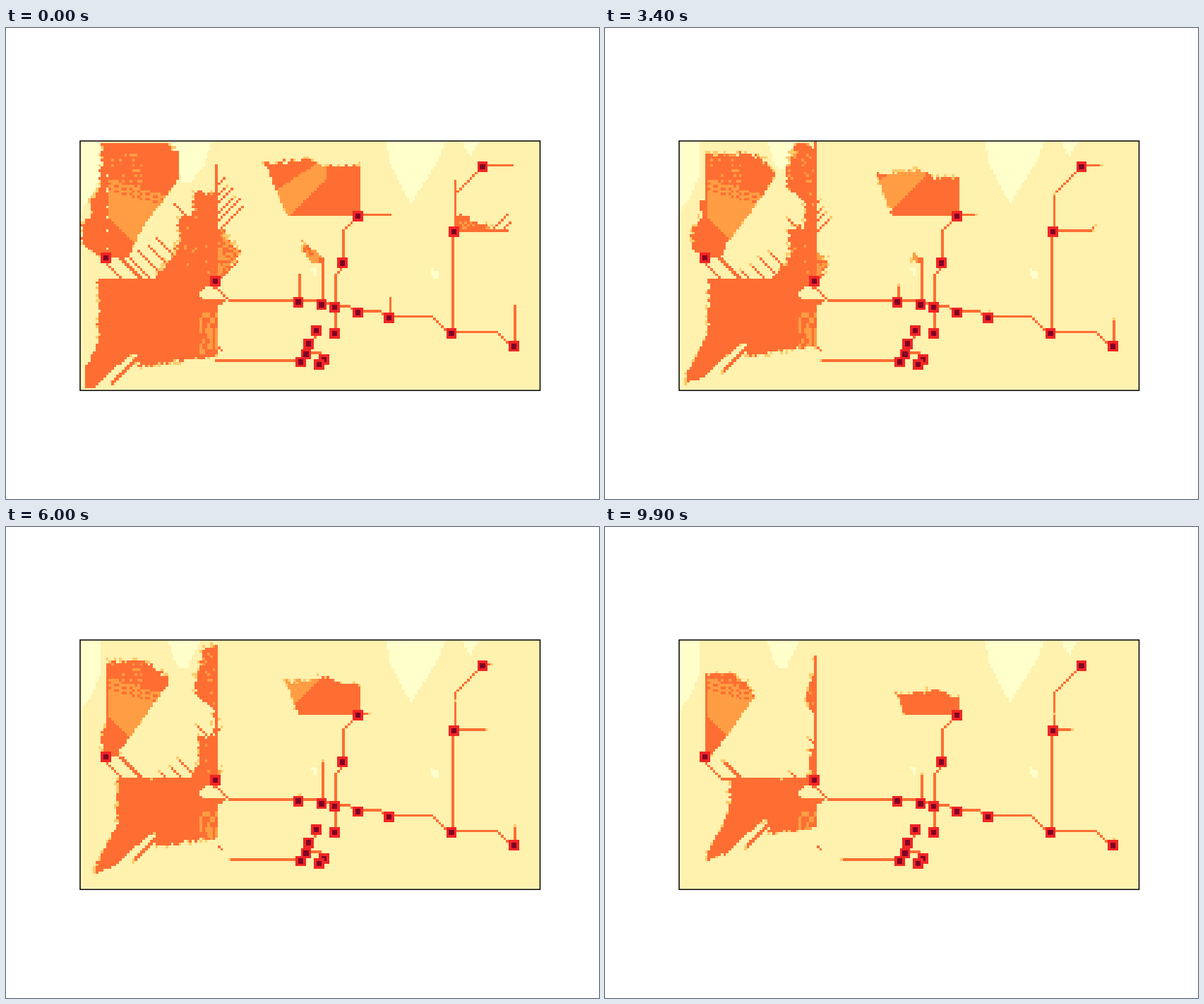
These frames come from a looping animation (840 by 667 pixels, 10000 ms). An HTML page with a canvas:

```html
<!DOCTYPE html>
<html lang="en">
<head>
<meta charset="utf-8">
<title>Shrinking reach map</title>
<style>
  html, body { margin: 0; width: 100%; height: 100%; overflow: hidden; background: #fff; }
  canvas { display: block; }
</style>
</head>
<body>
<canvas id="stage" width="840" height="667"></canvas>
<script>
const COLS = 177, ROWS = 96, LEFT = 105, TOP = 159.5, WIDTH = 651, HEIGHT = 354;
const CW = WIDTH / COLS, CH = HEIGHT / ROWS;
const BASE = '#fff1ae', PALE = '#ffffcc', EDGE = '#fecb6a', LIGHT = '#fe9d43',
      HOT = '#fe6e33', RED = '#f02625', DARK = '#800026';
const SPEED = 4.65; // px per second at which every reach shrinks

const stage = document.getElementById('stage').getContext('2d');
const gridCanvas = document.createElement('canvas');
gridCanvas.width = COLS;
gridCanvas.height = ROWS;
const grid = gridCanvas.getContext('2d');

function cell(c, r, color) {
  grid.fillStyle = color;
  grid.fillRect(c, r, 1, 1);
}

function hash(c, r, k) {
  const v = Math.sin(c * 127.1 + r * 311.7 + k * 74.7) * 43758.5453;
  return v - Math.floor(v);
}

function inside(p, x, y) {
  let hit = false;
  for (let i = 0, j = p.length - 2; i < p.length; j = i, i += 2) {
    if ((p[i + 1] > y) !== (p[j + 1] > y) &&
        x < (p[j] - p[i]) * (y - p[i + 1]) / (p[j + 1] - p[i + 1]) + p[i]) hit = !hit;
  }
  return hit;
}

// Visits the cells whose centres lie in a pixel box.
function eachCell([x0, y0, x1, y1], fn) {
  for (let r = Math.max(0, Math.round((y0 - TOP) / CH)); r < Math.round((y1 - TOP) / CH); r++)
    for (let c = Math.max(0, Math.round((x0 - LEFT) / CW)); c < Math.round((x1 - LEFT) / CW); c++)
      fn(c, r, LEFT + (c + .5) * CW, TOP + (r + .5) * CH);
}

function flat(p, color) {
  eachCell([LEFT, TOP, LEFT + WIDTH, TOP + HEIGHT],
    (c, r, x, y) => { if (inside(p, x, y)) cell(c, r, color); });
}

// An outline slides along `dir` behind a fixed box; its sliding edges are ragged.
function area({ box, dir, outline }, s, tint, shown = () => true) {
  const reached = (x, y, d) => inside(outline, x - dir[0] * d, y - dir[1] * d);
  eachCell(box, (c, r, x, y) => {
    if (!shown(x, y)) return;
    const d = SPEED * s + (hash(c, r, 1) - .5) * 5;
    if (reached(x, y, d)) cell(c, r, tint(c, r, x, y));
    else if (reached(x, y, d - 3) && hash(c, r, 2) < .5) cell(c, r, EDGE);
  });
}

// A straight run whose far end draws back towards its root; lengths are in cells.
function spur(c, r, dc, dr, length, s, cap = length) {
  const n = Math.round(Math.min(cap, length - SPEED * s / CW));
  for (let i = 0; i <= n; i++)
    cell(c + dc * i, r + dr * i, i === n && n < cap ? EDGE : HOT);
}

// Runs straight, then diagonally, then straight again to the second node.
function link([c, r], [c1, r1], lead) {
  const dc = Math.abs(c1 - c), dr = Math.abs(r1 - r), wide = dc > dr;
  let straight = Math.abs(dc - dr) - lead;
  while (c !== c1 || r !== r1) {
    cell(c, r - 1, HOT);
    if (wide || straight <= 0) c += Math.sign(c1 - c);
    if (!wide || straight <= 0) r += Math.sign(r1 - r);
    straight--;
  }
}

function drawNode([c, r]) {
  grid.fillStyle = RED;
  grid.fillRect(c - 2, r - 2, 4, 4);
  grid.fillStyle = DARK;
  grid.fillRect(c - 1, r - 1, 2, 2);
}

const chains = [
  { lead: -3, nodes: [[84, 62], [52, 54], [10, 45]] },
  { lead: 2, nodes: [[84, 62], [93, 63], [98, 64], [107, 66], [119, 68], [143, 74], [167, 79]] },
  { lead: 0, nodes: [[143, 74], [144, 35], [155, 10]] },
  { lead: 2, nodes: [[98, 74], [98, 64], [101, 47]] },
  { lead: 0, nodes: [[101, 47], [107, 29]] },
  { lead: 0, nodes: [[91, 73], [88, 78], [87, 82], [94, 84], [92, 86]] },
  { lead: 0, nodes: [[87, 82], [85, 85]] }
];

const northEastOfFirst = {
  box: [142, 162, 243, 326], dir: [-1, 1],
  outline: [142,163, 226,162, 250,180, 259,192, 221,246, 192,284, 172,326, 142,370]
};
const northWestOfFirst = {
  box: [106, 162, 142, 326], dir: [1, .4],
  outline: [137,163, 133,230, 121,242, 121,262, 108,280, 108,306, 140,328, 160,328, 160,163]
};
const southWest = {
  box: [112, 355, 299, 509], dir: [1, -1],
  outline: [131,300, 131,446, 100,506, 100,517, 126,508, 176,462, 184,462, 187,480, 340,458, 340,300]
};
const middle = {
  box: [200, 200, 299, 356], dir: [1, 1],
  outline: [268,232, 299,235, 299,400, 210,356, 235,325, 245,305, 245,270, 266,264]
};
const fringe = {
  box: [299, 280, 340, 356], dir: [-1, 1],
  outline: [280,283, 308,283, 313,300, 330,313, 329,323, 308,352, 280,380]
};
const upper = {
  box: [240, 161, 299, 262], dir: [1, 1],
  outline: [254,142, 267,139, 278,157, 320,157, 320,277, 241,209, 241,185, 251,159]
};
const centre = {
  box: [360, 180, 501, 265], dir: [1, 1],
  outline: [364,189, 380,192, 428,184, 450,196, 540,195, 540,340, 397,265, 371,198]
};
const sliver = {
  box: [418, 296, 450, 333], dir: [1, 1],
  outline: [421,300, 460,337, 460,360, 432,330, 422,319]
};
const eastFan = {
  box: [636, 260, 690, 288], dir: [-1, 1],
  outline: [600,264, 650,264, 660,275, 685,281, 686,300, 600,300]
};

function firstTint(c, r, x, y) {
  const depth = y - 215 - (x - 146) * .28;
  if (x > 145 && depth > 0 && y - x < 124) {
    const band = Math.floor(depth / CH);
    return (band === 1 || band === 3) && c % 3 ? HOT : LIGHT;
  }
  const dots = depth < 0 && x > 150 && x < 195 && y > 176 && r % 2 && hash(c, r, 4) < .25;
  return dots ? LIGHT : HOT;
}

const southWestTint = (c, r, x, y) =>
  x > 275 && y > 403 && hash(c, r >> 1, 5) < .4 ? LIGHT : HOT;

const speckled = rate => (c, r) => hash(c, r, 6) < rate ? LIGHT : HOT;

function drawGround(s) {
  grid.fillStyle = BASE;
  grid.fillRect(0, 0, COLS, ROWS);
  grid.fillStyle = '#fff8bb';
  grid.fillRect(0, 0, 1, ROWS);
  grid.fillRect(0, ROWS - 1, COLS, 1);
  flat([105,150, 135,150, 135,205, 120,240, 105,260], PALE);
  flat([536,150, 629,150, 606,197, 574,249, 545,195], PALE);
  flat([640,150, 676,150, 657,184], PALE);
  flat([432,338, 441,344, 438,352], PALE);
  flat([601,340, 613,345, 612,354, 605,356], PALE);
  flat(s < 3.4 ? [225,150, 296,150, 280,195, 262,217, 250,217]
               : [225,150, 280,150, 257,200, 244,200], PALE);
}

function drawAreas(s) {
  area(northEastOfFirst, s, firstTint);
  area(northWestOfFirst, s, firstTint);
  area(middle, s, speckled(.03));
  area(fringe, s, speckled(.6));
  area(southWest, s, southWestTint);
  flat([274,375, 288,364, 300,372, 308,383, 278,383], BASE);
  flat([278,383, 316,384, 299,394], HOT);
  if (s > 1.9) {
    area(upper, s, speckled(.1), (x, y) =>
      x < 247 + (s - 1.9) * 46 && y > 202 - (s - 2.4) * 40);
  }
  area(centre, s, (c, r, x, y) =>
    x < 455 && x + y < 668 - 1.4 * s && y + .64 * x > 474 - 3 * s ? LIGHT : HOT);
  area(sliver, s, speckled(.55));
  area(eastFan, s, speckled(.15));
}

function drawLines(s) {
  chains.forEach(({ lead, nodes }) => {
    for (let i = 1; i < nodes.length; i++) link(nodes[i - 1], nodes[i], lead);
  });

  const east = [[155, 9, 11], [144, 34, 19.5], [107, 28, 11.5]];
  const north = [[144, 34, 18.5], [84, 61, 10], [119, 67, 6.5], [167, 78, 14.5]];
  east.forEach(([c, r, n]) => spur(c, r, 1, 0, n, s));
  north.forEach(([c, r, n]) => spur(c, r, 0, -1, n, s));
  spur(85, 84, -1, 0, 35.5, s, 33);
  spur(93, 62, 0, -1, 23.5, s, 17);

  // Diagonal hatching around the large areas.
  for (let i = 0; i < 4; i++) spur(27 + 6 * i, 53, -1, -1, 8 + 2.5 * i, s);
  for (let i = 0; i < 2; i++) {
    spur(23 + i, 53, -1, -1, 20, s, 8);
    spur(34 - i, 70 + 2 * i, -1, 1, 22 - i, s);
  }
  for (let i = 0; i < 6; i++) spur(53, 16 + Math.round(3.5 * i), 1, -1, 2 + 1.4 * i, s);
  spur(53, 53, 1, -1, 7, s);
  spur(52, 40, -1, -1, 15.5, s);
  for (let i = 0; i < 2; i++) spur(158 + 4 * i, 34, 1, -1, 6 - 3 * i, s);
  spur(53, 79, 1, 1, 1, 0);

  const top = s < 3.4 ? 193 + 5 * s : Math.max(163, 163 + 3.7 * (s - 4.5));
  spur(52, 53, 0, -1, 53 - Math.floor((top - TOP) / CH), 0);
}

function draw(s) {
  drawGround(s);
  drawAreas(s);
  drawLines(s);
  chains.forEach(chain => chain.nodes.forEach(drawNode));

  stage.fillStyle = '#fff';
  stage.fillRect(0, 0, 840, 667);
  stage.imageSmoothingEnabled = false;
  stage.drawImage(gridCanvas, LEFT, TOP, WIDTH, HEIGHT);
  stage.strokeStyle = '#000';
  stage.lineWidth = 1.5;
  stage.strokeRect(LEFT, 160, 651.5, 353.3);
}

let shownStep = -1;
function tick() {
  const step = Math.floor(performance.now() % 10000 / 100);
  if (step !== shownStep) draw((shownStep = step) / 10);
  requestAnimationFrame(tick);
}
tick();
</script>
</body>
</html>
```
